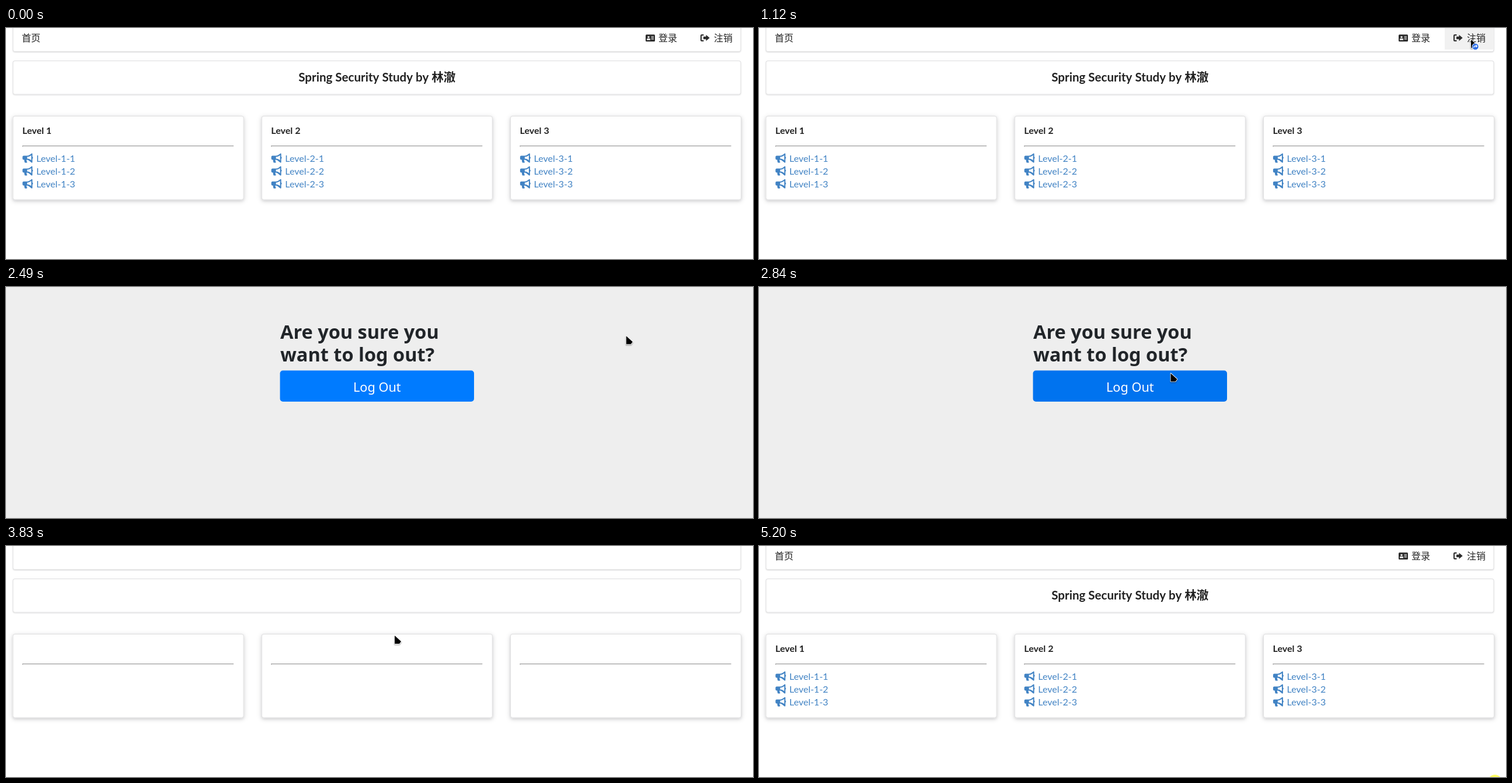
An HTML page with a canvas for the animation above (5.25 s loop, 1280 by 397 pixels).

```html
<!DOCTYPE html>
<html lang="zh">
<head>
<meta charset="utf-8">
<title>Spring Security Study</title>
<style>
  html, body { margin: 0; width: 100%; height: 100%; overflow: hidden; background: #fff; }
  canvas { display: block; }
</style>
</head>
<body>
<canvas id="stage" width="1280" height="397"></canvas>
<script>
const ctx = document.getElementById('stage').getContext('2d');
const LOOP = 5250;
const LATO = 'Lato, "Noto Sans CJK SC", "Noto Sans CJK", sans-serif';
const NOTO = '"Noto Sans", "Open Sans", sans-serif';
const INK = 'rgba(0,0,0,.87)';
const LINK = '#4183c4';

const horn = new Path2D('M18 7.5a2 2 0 0 1-1 1.7V15a1 1 0 0 1-1.6.8L12.7 13.7A7.5 7.5 0 0 0 8 11H7.1c-.4 1.3 0 2.4.7 3.4.5.7 0 1.6-.8 1.6H4.7a1 1 0 0 1-.9-.5C3.1 14.1 2.9 12.6 3 11H2a2 2 0 0 1-2-2V6a2 2 0 0 1 2-2H8a7.5 7.5 0 0 0 4.7-1.7L15.4.2A1 1 0 0 1 17 1V5.8a2 2 0 0 1 1 1.7ZM15 3.1l-1 .8A9.6 9.6 0 0 1 8 6V9a9.6 9.6 0 0 1 6 2.1l1 .8Z');
const exit = new Path2D('M5.5 0H2A2 2 0 0 0 0 2V10a2 2 0 0 0 2 2H5.5V10H2.5a.5.5 0 0 1-.5-.5V2.5a.5.5 0 0 1 .5-.5H5.5ZM9.5.8L15.7 6 9.5 11.2V8.3H5V3.7H9.5Z');
const arrow = new Path2D('M0 0V14H8L11 10Z');

// Pointer paths as [time, x, y]
const toLogout = [[440, 1250, 286], [575, 1226, 72], [680, 1221, 35], [890, 1220, 20]];
const toButton = [[2340, 1220, 20], [2490, 1064, 84], [2700, 800, 135], [2900, 666, 154]];
const toCorner = [[4250, 666, 154], [4400, 790, 205], [4640, 1120, 335], [4800, 1268, 400]];

const ramp = (t, a, b) => Math.min(1, Math.max(0, (t - a) / (b - a)));
const mix = (a, b, k) => `rgb(${a.map((v, i) => Math.round(v + (b[i] - v) * k))})`;

function along(keys, t) {
  let i = 1;
  while (i < keys.length - 1 && t > keys[i][0]) i++;
  const [ta, xa, ya] = keys[i - 1], [tb, xb, yb] = keys[i];
  const k = ramp(t, ta, tb);
  return [xa + (xb - xa) * k, ya + (yb - ya) * k];
}

function pointerAt(t) {
  if (t < 440 || t >= 4800) return null;
  return along(t < 2300 ? toLogout : t < 4200 ? toButton : toCorner, t);
}

function text(str, x, y, font, color, align = 'left') {
  ctx.font = font;
  ctx.fillStyle = color;
  ctx.textAlign = align;
  ctx.fillText(str, x, y);
}

function box(x, y, w, h, r, fill) {
  ctx.beginPath();
  ctx.roundRect(x, y, w, h, r);
  ctx.fillStyle = fill;
  ctx.fill();
}

function icon(path, x, y, color) {
  ctx.save();
  ctx.translate(x, y);
  ctx.fillStyle = color;
  ctx.fill(path, 'evenodd');
  ctx.restore();
}

function segment(x, y, w, h, shadows) {
  for (const [dy, blur, alpha] of shadows) {
    ctx.save();
    ctx.shadowOffsetY = dy;
    ctx.shadowBlur = blur;
    ctx.shadowColor = `rgba(34,36,38,${alpha})`;
    box(x, y, w, h, 4, '#fff');
    ctx.restore();
  }
  box(x, y, w, h, 4, '#dededf');
  box(x + 1, y + 1, w - 2, h - 2, 3, '#fff');
}

function idCard(x, y) {
  box(x, y, 16, 12, 1.5, '#2b2b2b');
  ctx.fillStyle = '#fff';
  ctx.beginPath();
  ctx.arc(x + 5, y + 4.3, 1.7, 0, 7);
  ctx.fill();
  box(x + 2, y + 6.8, 6, 2.7, [1.4, 1.4, 0, 0], '#fff');
  box(x + 9.5, y + 3, 4.5, 1, 0, '#fff');
  box(x + 9.5, y + 5.2, 4.5, 1, 0, '#fff');
  box(x + 9.5, y + 7.4, 4.5, 1, 0, '#fff');
}

function card(level, left, hasText, hasIcons) {
  segment(left, 151, 396, 144.5, [[2, 4, .12], [2, 10, .15]]);
  const x = left + 16.5;
  box(x, 202, 362, 1, 0, '#9c9c9c');
  box(x, 203, 362, 1, 0, '#e6e6e6');
  box(x, 202, 1, 2, 0, '#9c9c9c');
  if (hasText) text('Level ' + level, x, 182, '700 16px ' + LATO, INK);
  for (let n = 0; n < 3; n++) {
    const y = 229.5 + n * 22.1;
    if (hasText) text(`Level-${level}-${n + 1}`, x + 24, y, '16px ' + LATO, LINK);
    if (hasIcons) icon(horn, x + .3, y - 14, LINK);
  }
}

function home(t, pointer) {
  const hasText = t < 3000 || t >= 3910;
  const hasIcons = t < 3000 || t >= 3960;
  const hover = pointer && pointer[0] > 1175 && pointer[1] < 37;
  box(0, 0, 1280, 397, 0, '#fff');
  segment(11.5, -20, 1248, 61, [[1, 2, .15]]);
  if (hover) box(1175, 0, 84, 37, 0, '#f1f1f1');
  segment(11.5, 56, 1248, 58.5, [[1, 2, .15]]);
  if (hasText) {
    const font = '16px ' + LATO;
    text('首页', 27, 23.4, font, INK);
    text('登录', 1118, 23.4, font, INK);
    text('注销', 1213, 23.4, font, INK);
    text('Spring Security Study by 林澈', 635.8, 92, '700 20.57px ' + LATO, INK, 'center');
  }
  if (hasIcons) {
    idCard(1096, 11.3);
    icon(exit, 1190, 11, '#2b2b2b');
  }
  for (let i = 0; i < 3; i++) card(i + 1, 11.5 + i * 426.3, hasText, hasIcons);
}

function confirmPage(t) {
  box(0, 0, 1280, 397, 0, '#eee');
  const heading = '600 32.5px ' + NOTO;
  text('Are you sure you', 470, 89, heading, '#212529');
  text('want to log out?', 470, 128, heading, '#212529');

  if (t < 2150) {
    box(469.5, 143.5, 332.5, 31, 0, '#5f7388');
    box(471.5, 145.5, 328.5, 27, 0, '#d7e3f0');
    text('Log Out', 635.8, 166, '15.2px ' + NOTO, '#23292f', 'center');
    return;
  }
  const ring = ramp(t, 2960, 3130);
  if (ring) box(466.3, 140.3, 338.9, 59.9, 8, `rgba(0,123,255,${.5 * ring})`);
  const fill = t < 2400
    ? mix([215, 227, 240], [0, 123, 255], ramp(t, 2090, 2230))
    : mix([0, 123, 255], [0, 105, 217], ramp(t, 2784, 2920));
  box(469.5, 143.5, 332.5, 53.5, 5, fill);
  text('Log Out', 635.8, 180, '21.7px ' + NOTO, '#fff', 'center');
}

function drawPointer([x, y], badge) {
  ctx.save();
  ctx.translate(x, y);
  ctx.save();
  ctx.shadowColor = 'rgba(0,0,0,.4)';
  ctx.shadowBlur = 2;
  ctx.shadowOffsetY = 1.5;
  ctx.lineWidth = 1.6;
  ctx.lineJoin = 'round';
  ctx.strokeStyle = '#fff';
  ctx.stroke(arrow);
  ctx.restore();
  ctx.fillStyle = '#000';
  ctx.fill(arrow);
  if (badge) {
    box(1.5, 6, 12, 12, 6, '#fff');
    box(2.3, 6.8, 10.4, 10.4, 5.2, '#2f6fe6');
    ctx.strokeStyle = '#fff';
    ctx.lineWidth = 1.2;
    ctx.stroke(new Path2D('M5 14V12.5Q5 11.2 6.5 11.2H10M8.3 9.2L10.3 11.2 8.3 13.2'));
  }
  ctx.restore();
}

const start = performance.now();

function draw() {
  const t = (performance.now() - start) % LOOP;
  const pointer = pointerAt(t);
  if (t >= 2090 && t < 3830) confirmPage(t);
  else home(t, pointer);
  if (pointer) drawPointer(pointer, t >= 1020 && t < 2380);
  if (t >= 5200) box(1249, 393, 24, 24, 12, '#ffff66');
  requestAnimationFrame(draw);
}
draw();
</script>
</body>
</html>
```
